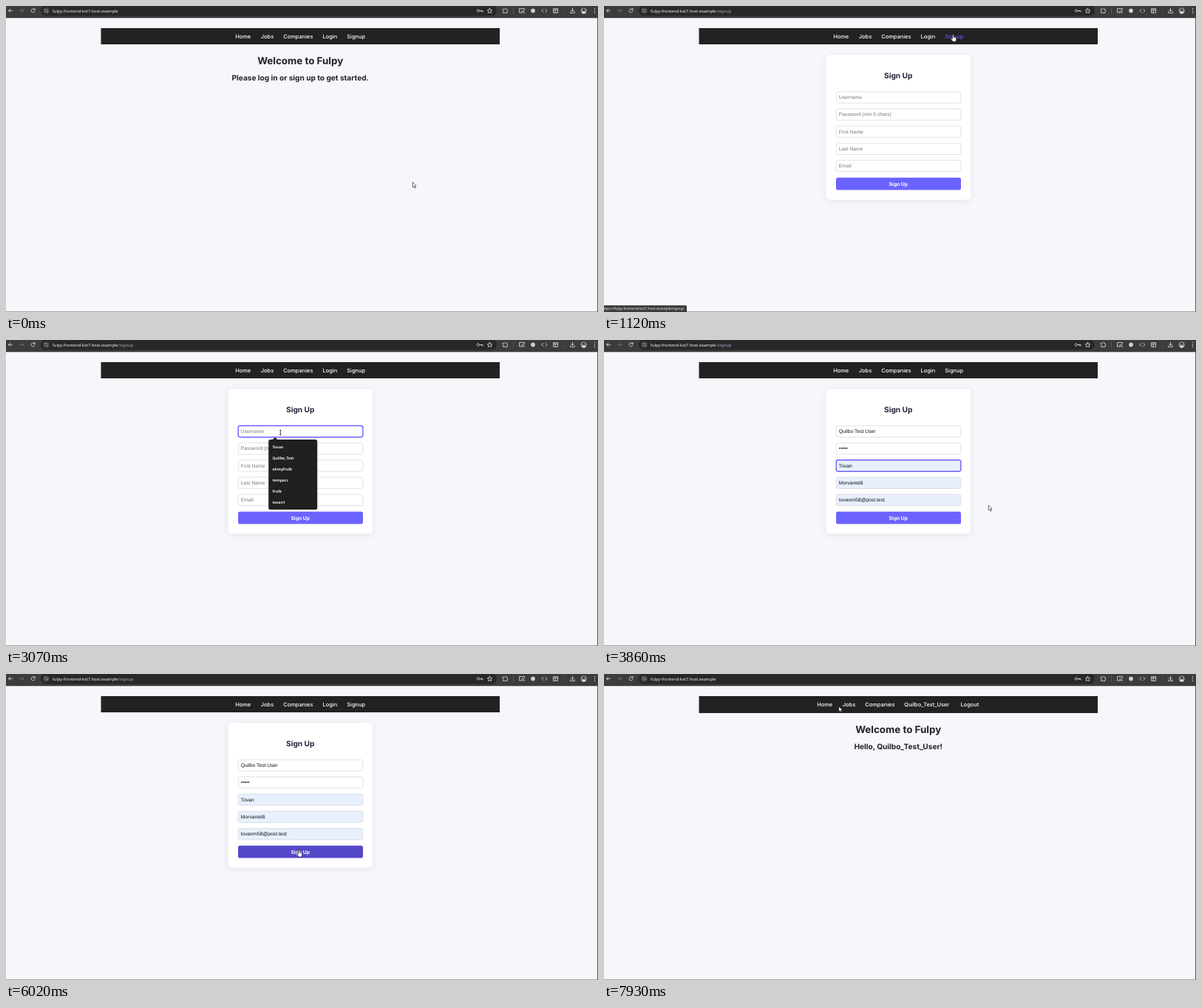
These frames come from a looping animation (801 by 415 pixels, 8 s). An HTML page:

```html
<!DOCTYPE html>
<html lang="en">
<head>
<meta charset="utf-8">
<title>Job board sign-up</title>
<style>
html, body { margin: 0; width: 100%; height: 100%; overflow: hidden; background: #f6f7fb; }
svg { display: block; width: 100%; height: 100%; }
text { text-rendering: geometricPrecision; white-space: pre; }
.ui { font-family: Inter, sans-serif; }
.sys { font-family: "Noto Sans", sans-serif; }
.field { font-family: "Liberation Sans", Arial, sans-serif; font-size: 6.75px; }
.nav { font-size: 7.43px; font-weight: 500; fill: #fff; }
.h1 { font-size: 13.4px; font-weight: 700; fill: #212228; }
.h2 { font-size: 10.125px; font-weight: 700; fill: #212228; }
.mid { text-anchor: middle; }
.icon { fill: none; stroke: #d6d6d6; stroke-width: .9; stroke-linecap: round; stroke-linejoin: round; }
#card { filter: drop-shadow(0 1.5px 4px rgba(30, 30, 70, .09)); }
</style>
</head>
<body>
<svg id="stage" viewBox="0 0 801 415" preserveAspectRatio="none"></svg>
<script>
const LOOP = 8000;
const HOST = "fulpy-frontend-kxt7.host.example";
const BRAND = "Fulpy";
const USER = "Quilbo_Test_User";
const MID = 398.2;

// Moments of the story, in ms
const OPEN_FORM = 1120, FOCUS = 2570, SUGGEST = 2670, FILL = 3860, PRESS = 4890, DONE = 6300;

const rect = (x, y, w, h, fill, more = "") =>
  `<rect x="${x}" y="${y}" width="${w}" height="${h}" fill="${fill}" ${more}/>`;
const text = (x, y, cls, str, more = "") =>
  `<text x="${x}" y="${y}" class="${cls}" ${more}>${str}</text>`;
const icon = (d, more = "") => `<path class="icon" d="${d}" ${more}/>`;
const group = (id, body) => `<g id="${id}">${body}</g>`;

function browserBar() {
  return rect(0, 0, 801, 16.3, "#3c3c3c") +
    rect(47, -1, 617, 14.6, "#282828", 'rx="7"') +
    icon("M8.5 6.3H3.5M5.8 4L3.5 6.3L5.8 8.6") +
    icon("M18.5 6.3H23.5M21.2 4L23.5 6.3L21.2 8.6", 'opacity=".35"') +
    icon("M38.6 4.8A2.5 2.5 0 1 0 39 7M39.1 3.4V5.2H37.3") +
    '<circle cx="54.5" cy="6.4" r="4.6" fill="#3f3f3f"/>' +
    icon("M52.4 5H54M56.2 5H56.6M52.4 7.8H52.8M55 7.8H56.6") +
    text(63, 8.6, "sys", HOST, 'font-size="5.65" fill="#f2f2f2"') +
    text(152, 8.6, "sys", "/signup", 'id="path" font-size="5.65" fill="#aaa7c6"') +
    icon("M640.6 6.3A1.7 1.7 0 1 0 640.6 6.5M640.8 6.4H645V8M643.2 6.4V7.6") +
    icon("M654.5 3.2L655.5 5.3L657.8 5.6L656.1 7.2L656.5 9.5L654.5 8.4L652.5 9.5L652.9 7.2L651.2 5.6L653.5 5.3Z") +
    icon("M672.6 4.2H674.4Q675.4 2.4 676.4 4.2H678V6Q679.8 7 678 8V9.3H672.6V7.8Q674 6.8 672.6 5.9Z") +
    rect(686, 2.5, .9, 8, "#55606e") +
    icon("M698 9H694.6V3.4H701.4V5.4M700.6 7.2A1.4 1.4 0 1 0 700.6 7.3M700.4 8.4L701.8 9.8") +
    '<circle cx="713" cy="6.4" r="2.8" fill="#d0d0d0"/>' +
    icon("M727 4.3L724.9 6.4L727 8.5M729.9 4.3L732 6.4L729.9 8.5") +
    icon("M741 3.6H746.6V9.2H741ZM741 5.4H746.6M743.2 5.4V9.2") +
    rect(754.8, 2.5, .9, 8, "#505050") +
    icon("M766.5 3V7.2M764.6 5.5L766.5 7.4L768.4 5.5M763.6 7.8V9.4H769.4V7.8") +
    '<circle cx="781.7" cy="6.4" r="4.2" fill="#8d8a85"/>' +
    '<circle cx="781.7" cy="5" r="1.5" fill="#2b2a2a"/>' +
    '<path d="M778.6 9.2Q781.7 5.6 784.8 9.2Q781.7 11.8 778.6 9.2Z" fill="#e4e1dc"/>' +
    [3.6, 6.4, 9.2].map(y => `<circle cx="796.5" cy="${y}" r=".75" fill="#d6d6d6"/>`).join("");
}

function navBar(height, items) {
  return rect(128.5, 30, 539.5, height, "#222") +
    items.map(([x, label]) =>
      text(x, 43.8, "ui nav", label, label === "Signup" ? 'id="signup"' : "")).join("");
}

function headings(y, line) {
  return text(MID, y, "ui h1 mid", "Welcome to " + BRAND) +
    text(MID, y + 21.7, "ui h2 mid", line);
}

const fields = [
  ["Username", USER.replaceAll("_", " ")],
  ["Password (min 5 chars)", "•••••"],
  ["First Name", "Tovan"],
  ["Last Name", "Morvantelli"],
  ["Email", "tovanm58@post.test"]
];

function form() {
  const inputs = fields.map((f, i) => {
    const y = 116.3 + i * 23.25;
    return rect(314.2, y, 168.6, 15.4, "#fff", `id="box${i}" rx="2.6"`) +
      text(317.8, y + 9.9, "field", f[0], `id="val${i}"`);
  }).join("");
  return rect(300.6, 66.2, 195.4, 196.6, "#fff", 'id="card" rx="5"') +
    text(MID, 97.6, "ui h2 mid", "Sign Up", 'style="fill:#23233b"') + inputs +
    rect(314, 232.7, 169, 16.8, "#6c63ff", 'id="button" rx="2.6"') +
    text(MID, 243.5, "ui mid", "Sign Up", 'font-size="6.75" font-weight="700" fill="#fff"') +
    rect(318, 120.8, .6, 5.6, "#222", 'id="caret"');
}

function suggestions() {
  const names = ["Tovan", "Quilbo_Test", "ohmyfrulb", "tempacc", "frulb", "tovan1"];
  return '<path d="M360.4 135.6L364 131.8L367.6 135.6Z" fill="#202020"/>' +
    rect(355.2, 135, 66, 95, "#202020", 'rx="2.6"') +
    names.map((n, i) =>
      text(360.5, 146.6 + i * 15.15, "sys", n, 'font-size="5.05" font-weight="600" fill="#f2f2f2"')).join("");
}

const outline = 'stroke="#111" stroke-width=".6" stroke-linejoin="round"';
const cursors = {
  arrow: `<path d="M0 0V7L1.6 5.6L2.7 8.2L3.8 7.7L2.7 5.2H4.9Z" fill="#fff" ${outline}/>`,
  hand: `<path d="M-.7 .7Q0 -.5 .8 .7V3.8L3.8 4.5Q4.8 4.9 4.5 6.8L3.7 9.8H-.1L-2.6 6.4Q-2.6 5.1 -1.5 5.5L-.7 6.3Z" fill="#fff" ${outline}/>`,
  beam: '<path d="M-1.2 -3.2H1.2M0 -3.2V3.2M-1.2 3.2H1.2" fill="none" stroke="#111" stroke-width=".8"/>'
};

const baseNav = [[310.2, "Home"], [344.8, "Jobs"], [375.3, "Companies"]];
const stage = document.getElementById("stage");
stage.innerHTML =
  rect(0, 0, 801, 415, "#f6f7fb") +
  group("guest", navBar(22, [...baseNav, [428.5, "Login"], [461.3, "Signup"]])) +
  group("intro", headings(79, "Please log in or sign up to get started.")) +
  group("form", form()) +
  group("member",
    navBar(23, [...baseNav.map(([x, s]) => [x - 22, s]), [406.2, USER], [482.6, "Logout"]]) +
    headings(80, `Hello, ${USER}!`)) +
  browserBar() +
  rect(0, 414, 801, 1, "#a2a2a4") + rect(800, 16, 1, 399, "#55565a") +
  group("status", '<path d="M0 406H110.5Q112 406 112 407.5V415H0Z" fill="#3c3c3c"/>' +
    text(-.3, 412.2, "sys", `ttps://${HOST}/signup`, 'font-size="4.93" fill="#f0f0f0"')) +
  group("list", suggestions()) +
  group("pointer", Object.keys(cursors).map(k => group(k, cursors[k])).join(""));

const $ = id => document.getElementById(id);
const show = (id, on) => $(id).setAttribute("visibility", on ? "inherit" : "hidden");
const set = (id, attr, v) => $(id).setAttribute(attr, v);
const clamp = v => Math.max(0, Math.min(1, v));
const ramp = (t, a, b) => clamp((t - a) / (b - a));
const smooth = k => k * k * (3 - 2 * k);

// Pointer moves: start, end, from x, y, to x, y
const moves = [
  [30, 840, 550.3, 238.8, 472.2, 38.4],
  [1680, 1850, 472.2, 38.4, 466, 44.5],
  [1950, 2300, 466, 44.5, 379, 121.2],
  [2300, 2600, 379, 121.2, 371.3, 125.5],
  [FILL, 4620, 520.3, 224, 392.5, 237.5],
  [5640, 5750, 392.5, 237.5, 393.5, 238.4],
  [5960, 6020, 393.5, 238.4, 396.2, 238.2],
  [6770, 6830, 396, 238.2, 401.2, 232.2],
  [7240, 7930, 401.2, 232.2, 317.8, 44]
];

function pointerAt(t) {
  const m = moves.findLast(v => t >= v[0]) || moves[0];
  const k = smooth(ramp(t, m[0], m[1]));
  return [m[2] + (m[4] - m[2]) * k, m[3] + (m[5] - m[3]) * k];
}

function render(t) {
  const [x, y] = pointerAt(t);
  const formOn = t >= OPEN_FORM && t < DONE;
  const filled = t >= FILL;
  const overLink = t < FOCUS && y < 50 && x > 461;
  const overButton = formOn && filled && x < 483 && y > 230;
  const overField = formOn && !filled && y > 116;

  show("guest", t < DONE);
  show("intro", t < OPEN_FORM);
  show("form", formOn);
  show("member", t >= DONE);
  show("path", formOn);
  show("list", t >= SUGGEST && !filled);
  show("caret", t >= FOCUS && t < 3070);
  set("status", "opacity", ramp(t, 850, 1000) * (1 - ramp(t, 2330, 2480)));
  set("signup", "style", overLink ? "fill:#6259f2" : "");
  set("button", "fill", overButton ? "#5448c8" : "#6c63ff");

  const active = t < FOCUS ? -1 : !filled ? 0 : t < PRESS ? 2 : -1;
  fields.forEach((f, i) => {
    const on = i === active;
    set("box" + i, "fill", filled && i > 1 ? "#e8f0fe" : "#fff");
    set("box" + i, "stroke", on ? "#6c63ff" : "#cfcfd4");
    set("box" + i, "stroke-width", on ? 1.4 : .6);
    set("val" + i, "fill", filled ? "#111" : "#797982");
    $("val" + i).textContent = f[filled ? 1 : 0];
  });

  const kind = overLink || overButton ? "hand" : overField ? "beam" : "arrow";
  Object.keys(cursors).forEach(k => show(k, k === kind));
  set("pointer", "transform", `translate(${x.toFixed(2)} ${y.toFixed(2)})`);
}

const start = performance.now();
function tick() {
  render((performance.now() - start) % LOOP);
  requestAnimationFrame(tick);
}
tick();
</script>
</body>
</html>
```
